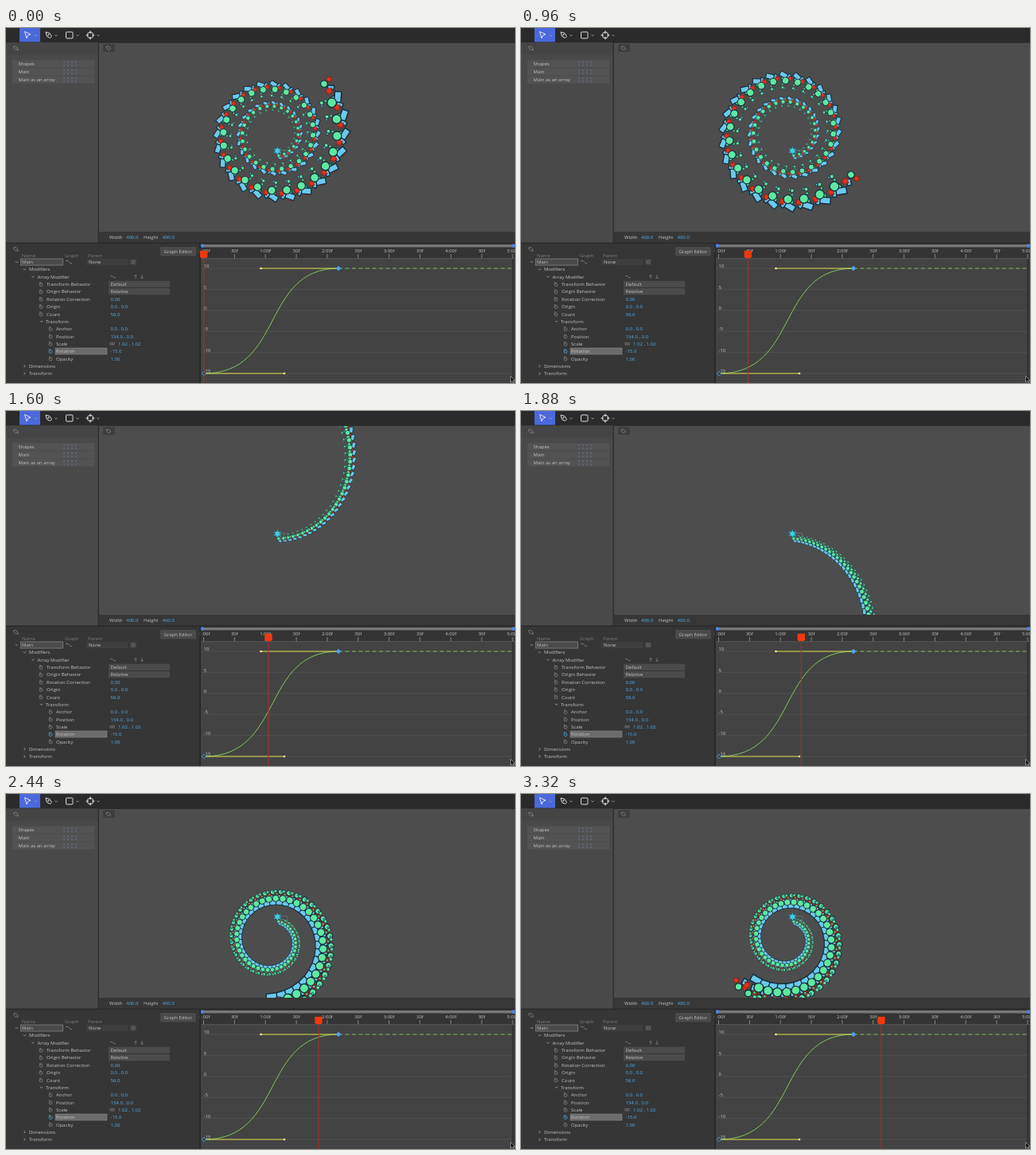
Recreate the animation shown at these times as an HTML page with a canvas. Size 640 by 446 pixels, loop 3360 ms.

```html
<!DOCTYPE html>
<html lang="en">
<head>
<meta charset="utf-8">
<title>Array modifier</title>
<style>
  html, body { margin: 0; width: 100%; height: 100%; overflow: hidden; background: #363636; }
  svg, canvas { position: absolute; left: 0; top: 0; width: 640px; height: 446px; }
  canvas { left: 117px; top: 19px; width: 523px; height: 237px; }
  text { font: 6px "Open Sans", "Noto Sans", sans-serif; fill: #c4c4c4; }
  text.dim { fill: #7c7c7c; }
  text.val { fill: #58aee8; }
  text.mid { text-anchor: middle; }
</style>
</head>
<body>
<svg id="ui" viewBox="0 0 640 446"></svg>
<canvas id="view" width="523" height="237"></canvas>
<svg id="over" viewBox="0 0 640 446">
  <g id="head">
    <path d="M0 289V446" stroke="#a8302a" stroke-width="1.1"/>
    <path d="M-4.7 279.8H4.7V287.5L3.2 289H-3.2L-4.7 287.5Z" fill="#f2380f"/>
  </g>
  <path d="M634.5 437.5V445L636.5 443.3L637.8 446L639 445.4L637.8 442.9H640Z" fill="#111" stroke="#ddd" stroke-width=".5"/>
</svg>
<script>
const ui = document.getElementById('ui');
const NS = 'http://www.w3.org/2000/svg';

function add(tag, attrs, content) {
  const el = document.createElementNS(NS, tag);
  for (const key in attrs) el.setAttribute(key, attrs[key]);
  if (content) el.textContent = content;
  return ui.appendChild(el);
}
const rect = (x, y, width, height, fill, more) => add('rect', { x, y, width, height, fill, ...more });
const line = (d, stroke, width = 1, more) => add('path', { d, stroke, 'stroke-width': width, fill: 'none', ...more });
const label = (x, y, str, cls = '') => add('text', { x, y: y + 2.2, class: cls }, str);
const dot = (cx, cy, r, fill, more) => add('circle', { cx, cy, r, fill, ...more });
const chevron = (x, y, s = 1.6, c = '#aaa') => line(`M${x - s} ${y - s / 2}L${x} ${y + s / 2}L${x + s} ${y - s / 2}`, c, .8);

function pin(x, y) {
  line(`M${x - 3} ${y - 2}L${x} ${y - 2.6}L${x + 2.6} ${y + .6}L${x} ${y + 2.2}L${x - 2} ${y + .6}Z`, '#858585', .8);
  dot(x + 2.4, y + 2, .8, '#858585');
}
function watch(x, y, color) {
  dot(x, y + .5, 2, 'none', { stroke: color, 'stroke-width': .7 });
  line(`M${x - 2.2} ${y - 2.4}H${x}M${x} ${y + .5}L${x - 1.6} ${y - 1.4}`, color, .6);
}

function drawPanels() {
  rect(0, 0, 640, 18.5, '#2b2b2b');
  rect(0, 18.5, 116, 251.5, '#494949');
  rect(0, 18.5, 116, 15, '#454545');
  rect(117, 19, 523, 237, '#4d4d4d');
  rect(115.5, 18.5, 1.5, 252, '#303030');
  rect(117, 256, 523, 14, '#373737');
  rect(0, 269.5, 640, 1.5, '#2b2b2b');
  rect(0, 271, 243, 175, '#363636');
  rect(243, 271, 2, 175, '#292929');
  rect(245, 271, 395, 19, '#343434');
  rect(245, 290, 395, 156, '#434343');
  rect(637, 290, 3, 156, '#383838');
}

function drawTools() {
  rect(17, 0, 26, 17.5, '#4b69dc');
  line('M23.5 4.5L31 8L27.5 9.3L26 13Z', '#e4e4f4', 1);
  line('M50 5L55 6.5L57.5 10.5L55.5 12.5L51.5 10.5Z', '#ddd', 1);
  dot(53.5, 8.5, 1, '#ddd');
  rect(75.5, 5, 8.5, 8, 'none', { stroke: '#ddd', rx: 1 });
  dot(106, 9, 3.8, 'none', { stroke: '#ddd' });
  line('M106 3.5V7M106 11V14.5M100.5 9H104M108 9H111.5', '#ddd', 1.2);
  [37.5, 63, 90, 116].forEach(x => chevron(x, 9.3));

  pin(12.5, 25.5);
  pin(12.5, 278);
  ['Shapes', 'Main', 'Main as an array'].forEach((name, i) => {
    const y = 45 + i * 10;
    rect(8, y - 4.6, 103.5, 9.2, '#535353');
    label(15.5, y, name);
    for (let n = 0; n < 8; n++) rect(72 + (n % 4) * 5, y - 2.5 + (n >> 2) * 4, 2, 1, '#67779c');
  });
  label(130, 262.5, 'Width');
  label(151, 262.5, '400.0', 'val');
  label(173, 262.5, 'Height');
  label(196.5, 262.5, '400.0', 'val');
}

function drawTree() {
  label(20, 285.5, 'Name', 'dim');
  label(74, 285.5, 'Graph', 'dim');
  label(103, 285.5, 'Parent', 'dim');
  rect(194, 275, 45, 11.5, '#4a4a4a', { rx: 1.5 });
  label(216.3, 280.7, 'Graph Editor', 'mid');
  rect(18.5, 290, 53, 8, '#4a4a4a', { stroke: '#8c8c8c', 'stroke-width': .7 });
  chevron(13.5, 294);
  label(20, 294, 'Main');
  line('M75 292.5H78L81 295.5H83', '#888', .8);
  rect(101, 290, 52, 8, '#3e3e3e');
  label(104, 294, 'None');
  rect(156, 290.5, 8, 7, '#444');
  dot(160, 294, 2, 'none', { stroke: '#777', 'stroke-width': .8 });

  rect(129, 317.7, 77, 8.2, '#4b4b4b');
  rect(129, 327, 77, 8.2, '#4b4b4b');
  rect(62, 402, 65, 8, '#6b6b6b', { stroke: '#8b8b8b', 'stroke-width': .5 });

  const rows = [
    [29, 'Modifiers', 'open'], [39.5, 'Array Modifier', 'open'],
    [51, 'Transform Behavior', '', 'Default'], [51, 'Origin Behavior', '', 'Relative'],
    [51, 'Rotation Correction', '', '0.00'], [51, 'Origin', '', '0.0 , 0.0'], [51, 'Count', '', '56.0'],
    [50, 'Transform', 'open'],
    [63, 'Anchor', '', '0.0 , 0.0'], [63, 'Position', '', '154.0 , 0.0'], [63, 'Scale', '', '1.02 , 1.02'],
    [63, 'Rotation', '', '-15.0'], [63, 'Opacity', '', '1.00'],
    [29, 'Dimensions', 'shut'], [29, 'Transform', 'shut']
  ];
  rows.forEach(([x, name, fold, value], i) => {
    const y = 303.2 + i * 9.35;
    label(x, y, name);
    if (fold === 'open') chevron(x - 5.5, y);
    else if (fold === 'shut') line(`M${x - 6.5} ${y - 1.8}L${x - 4.8} ${y}L${x - 6.5} ${y + 1.8}`, '#aaa', .8);
    else watch(x - 7, y, name === 'Rotation' ? '#58aee8' : '#8c8c8c');
    if (value) label(name === 'Scale' ? 141 : 131.5, y, value, /\d/.test(value) ? 'val' : '');
  });
  line('M131 311.5H133.5L135.5 313.5H138M163 315V310.5M161.5 312L163 310.3L164.5 312M171 310V314.5M169.5 313L171 314.7L172.5 313', '#888', .7);
  [132, 135].forEach(x => dot(x, 396.7, 1.5, 'none', { stroke: '#888', 'stroke-width': .7 }));
}

function drawGraph() {
  rect(247, 272, 391, 3.4, '#777');
  dot(247, 273.6, 2.3, '#4b83ee');
  dot(638, 273.6, 2.3, '#4b83ee');
  for (let i = 0; i <= 10; i++) {
    const x = 248.5 + i * 38.85;
    line(`M${x} 284V290`, '#999', .8);
    label(i ? x : 249.5, 279.5, i % 2 ? '30f' : i / 2 + ':00f', 'mid');
  }
  rect(243, 276, 3.4, 8, '#303030');
  line('M245 289.7H640', '#585858');
  for (let i = 0; i < 6; i++) {
    const y = 302 + i * 26.4;
    line(`M246 ${y}H637`, '#505050');
    label(248.5, y - 3, String(10 - i * 5));
  }
  line('M637 290V446', '#2c2c2c');
  line('M418 302H637', '#78ba55', 1, { 'stroke-dasharray': '5 3.5' });
  line('M249 434C350 434 320.5 302 418 302', '#80c75c', 1);
  line('M249 434H350M320.5 302H418', '#dede4a', 1);
  dot(350, 434, 1.3, '#f4f48c');
  dot(320.5, 302, 1.3, '#f4f48c');
  const key = (x, y, fill) => add('path', {
    d: `M${x - 2.8} ${y}L${x} ${y - 2.8}L${x + 2.8} ${y}L${x} ${y + 2.8}Z`, fill, stroke: '#4ba5ee', 'stroke-width': .8
  });
  key(249, 434, '#434343');
  key(418, 302, '#4ba5ee');
}

drawPanels();
drawTools();
drawTree();
drawGraph();

// Playhead position over time: [ms, x]
const LOOP = 3360;
const track = [[0, 248.7], [420, 248.7], [640, 264], [1240, 304], [1600, 330], [2120, 371.5], [2440, 393], [3320, 453], [3360, 455.7]];

function headX(ms) {
  const i = Math.max(1, track.findIndex(p => p[0] >= ms));
  const [t0, x0] = track[i - 1], [t1, x1] = track[i];
  return x0 + (x1 - x0) * (ms - t0) / (t1 - t0);
}

// Value of the graph's curve under the playhead
function rotationAt(x) {
  const p = Math.min(1, Math.max(0, (x - 249) / 169));
  let lo = 0, hi = 1;
  for (let i = 0; i < 24; i++) {
    const u = (lo + hi) / 2, v = 1 - u;
    if (3 * v * v * u * .598 + 3 * v * u * u * .423 + u ** 3 < p) lo = u; else hi = u;
  }
  return -15 + 25 * lo * lo * (3 - 2 * lo);
}

const ctx = document.getElementById('view').getContext('2d');
const GREEN = '#5fe8a0', BLUE = '#6cc8ec', RED = '#e0321c', INK = '#15303f';

function paint(fill) {
  ctx.fillStyle = fill;
  ctx.fill();
  ctx.stroke();
}
function disc(x, y, r, fill) {
  ctx.beginPath();
  ctx.arc(x, y, r, 0, Math.PI * 2);
  paint(fill);
}
function box(x, y, w, h, tilt, fill) {
  ctx.save();
  ctx.translate(x, y);
  ctx.rotate(tilt);
  ctx.beginPath();
  ctx.rect(-w / 2, -h / 2, w, h);
  paint(fill);
  ctx.restore();
}
function star(x, y, r, points, inner, fill) {
  ctx.beginPath();
  for (let i = 0; i < points * 2; i++) {
    const a = i * Math.PI / points - Math.PI / 2, q = i % 2 ? r * inner : r;
    ctx.lineTo(x + q * Math.cos(a), y + q * Math.sin(a));
  }
  ctx.closePath();
  paint(fill);
}

function drawCopy() {
  ctx.lineWidth = .5;
  ctx.strokeStyle = INK;
  box(9.2, 10.5, 4.5, 2.8, .32, BLUE);
  box(13.8, 8.7, 1.7, 2.7, .3, BLUE);
  ctx.strokeStyle = '#7d2016';
  ctx.lineWidth = .25;
  star(17.4, 8.8, 1.4, 5, .6, RED);
  star(12.6, 7.6, 1.7, 5, .6, RED);
  ctx.strokeStyle = INK;
  box(7.2, 3, .8, .9, .3, BLUE);
  disc(8.9, 5, .55, GREEN);
  disc(8.5, 3.2, .8, GREEN);
  ctx.lineWidth = .45;
  disc(16, 6.3, 1.45, GREEN);
  disc(7.5, 7.4, 1.95, GREEN);
}

function drawView(degrees) {
  ctx.setTransform(1, 0, 0, 1, -117, -19);
  ctx.fillStyle = '#4d4d4d';
  ctx.fillRect(117, 19, 523, 237);
  ctx.fillStyle = '#3e3e3e';
  ctx.fillRect(122, 20, 15, 10);
  ctx.strokeStyle = '#858585';
  ctx.lineWidth = .8;
  ctx.stroke(new Path2D('M126 23.5L129 22.9L131.6 26.1L129 27.7L127 26.1Z'));

  ctx.save();
  ctx.translate(335.3, 152.9);
  for (let k = 0; k < 56; k++) {
    drawCopy();
    ctx.translate(5.25, 0);
    ctx.rotate(degrees * Math.PI / 180);
    ctx.scale(1.02, 1.02);
  }
  ctx.restore();

  ctx.strokeStyle = '#777';
  ctx.lineWidth = .6;
  ctx.strokeRect(345.5, 153.5, 8, 9);
  ctx.strokeStyle = '#1d6f80';
  star(341.3, 154.3, 5.4, 6, .5, '#40cfe6');
}

const head = document.getElementById('head');
const start = performance.now();
function tick(now) {
  const ms = Math.floor((Math.max(0, now - start) % LOOP) / 40) * 40;
  const x = headX(ms);
  head.setAttribute('transform', `translate(${x} 0)`);
  drawView(rotationAt(x));
  requestAnimationFrame(tick);
}
tick(start);
</script>
</body>
</html>
```
